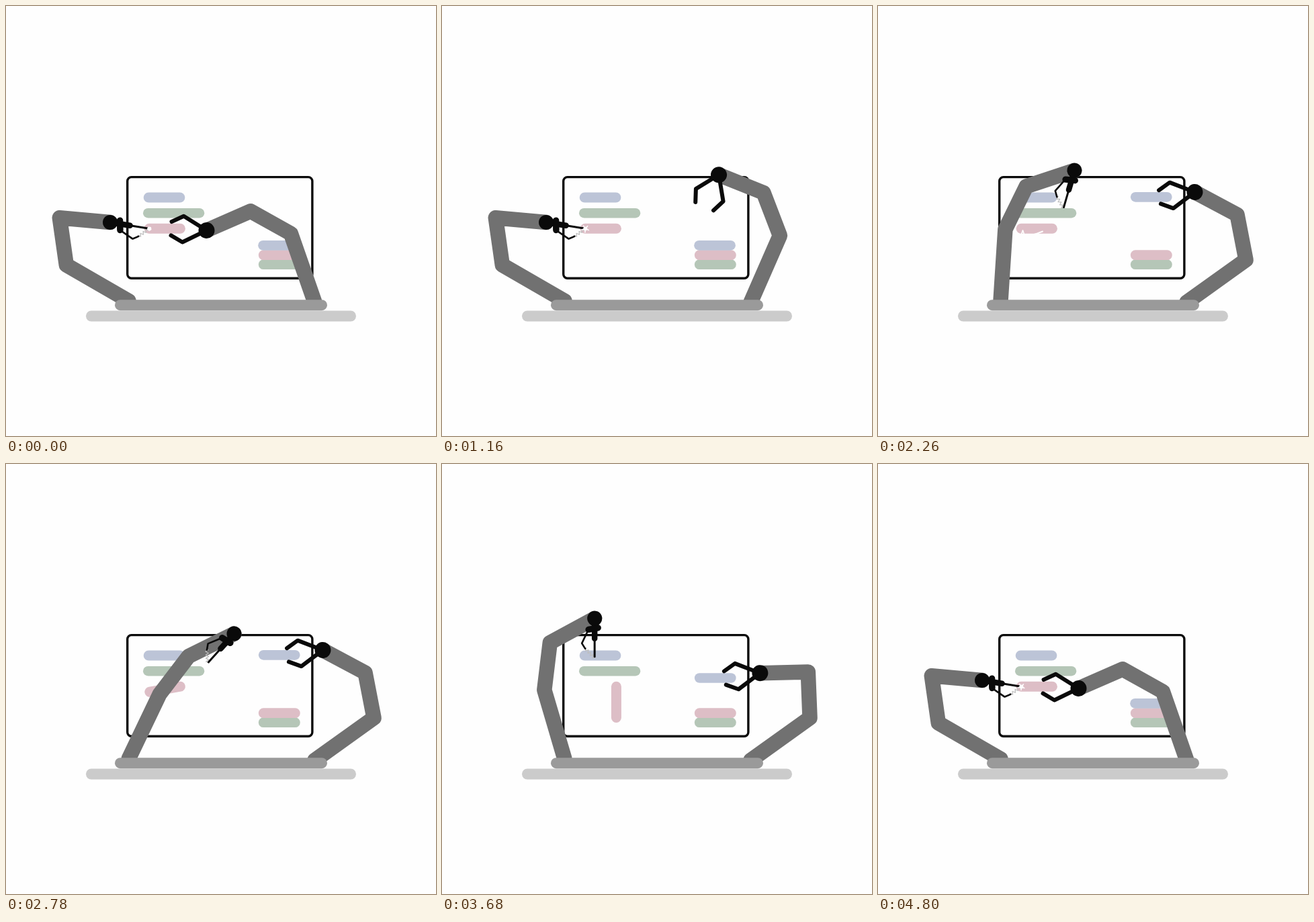
Recreate the animation shown at these times as an HTML page with a canvas. Size 640 px wide and 640 px high, loop 4.82 s.

```html
<!DOCTYPE html>
<html lang="en">
<head>
<meta charset="utf-8">
<title>Robot arms</title>
<style>
  html, body { margin: 0; width: 100%; height: 100%; overflow: hidden; background: #fefefe; }
  canvas { display: block; width: 640px; height: 640px; }
</style>
</head>
<body>
<canvas id="stage" width="640" height="640"></canvas>
<script>
const LOOP = 4820;
const BLACK = '#0a0a0a', WHITE = '#fefefe', ARM = '#717171';
const BLUE = '#bcc4d7', GREEN = '#b5c6b7', PINK = '#ddbec6';
const TAU = Math.PI * 2;
const ctx = document.getElementById('stage').getContext('2d');

const rad = d => d * Math.PI / 180;
const deg = r => r * 180 / Math.PI;
const mix = (a, b, k) => a + (b - a) * k;
const ramp = (t, from, to) => Math.min(1, Math.max(0, (t - from) / (to - from)));
const bump = (t, mid, half) => Math.max(0, Math.cos(Math.PI / 2 * Math.min(1, Math.abs(t - mid) / half)));
const easeOut = k => 1 - (1 - k) ** 2;
const polar = (r, angle) => [r * Math.cos(rad(angle)), r * Math.sin(rad(angle))];

// An arm has three links; side -1 mirrors all its angles.
const left = { base: [182.5, 439], links: [107, 71, 75.5], side: 1 };
const right = { base: [459.5, 441], links: [108.3, 68.5, 71.5], side: -1 };

function joints(arm, angles) {
  const points = [arm.base];
  arm.links.forEach((r, i) => {
    const [dx, dy] = polar(r, angles[i]);
    const [x, y] = points[i];
    points.push([x + dx * arm.side, y + dy]);
  });
  return points;
}

// Turns a lower link angle, a wrist position and a tool angle into link angles.
function pose(arm, lower, x, y, tool) {
  const [, a, b] = arm.links;
  const elbow = joints(arm, [lower, 0, 0])[1];
  const dx = (x - elbow[0]) * arm.side, dy = y - elbow[1];
  const d = Math.min(a + b, Math.hypot(dx, dy));
  const upper = Math.atan2(dy, dx) - Math.acos((a * a + d * d - b * b) / (2 * a * d));
  const fore = Math.atan2(dy - a * Math.sin(upper), dx - a * Math.cos(upper));
  return [lower, deg(upper), deg(fore), tool];
}

const weld = pose(left, -150, 155, 322, 9);
const cut = pose(left, -144.9, 165.3, 311, 37);
const reach = pose(left, -64.4, 339.5, 252.6, 132);
const ready = [...reach.slice(0, 3), 90];
const away = pose(left, -146.2, 132, 275.3, 90);

const hold = pose(right, -70.8, 298.5, 334, -3);
const swung = pose(right, -144.4, 515, 252, 8);
const pick = pose(right, -144.4, 474, 349, 8);
const half = pose(right, -144.4, 473.4, 311, 8);
const lifted = pose(right, -144.4, 471.5, 277, 8);
const cross = pose(right, -114.2, 398, 308, 8);
const scoop = pose(right, -70.8, 311, 360, 8);

// Moves: start, end, pose reached, easing
const leftMoves = [
  [1640, 1840, cut],
  [1840, 2720, reach, easeOut],
  [2880, 3140, ready],
  [3260, 4080, away],
  [4340, 4800, weld]
];
const rightMoves = [
  [800, 1420, swung],
  [1420, 1620, pick],
  [1620, 1820, lifted],
  [3460, 3680, half],
  [3680, 3900, pick],
  [3900, 4080, cross],
  [4080, 4340, scoop],
  [4420, 4780, hold]
];

function poseAt(rest, moves, t) {
  return moves.reduce((now, [from, to, next, ease = k => k]) => {
    const k = ease(ramp(t, from, to));
    return now.map((v, i) => mix(v, next[i], k));
  }, rest);
}

function line(points, width, color) {
  ctx.beginPath();
  points.forEach(p => ctx.lineTo(...p));
  ctx.lineWidth = width;
  ctx.strokeStyle = color;
  ctx.stroke();
}

function dot(x, y, r, color = BLACK) {
  ctx.beginPath();
  ctx.arc(x, y, r, 0, TAU);
  ctx.fillStyle = color;
  ctx.fill();
}

function bar(x, y, w, h, color) {
  line([[x + h / 2, y], [x + w - h / 2, y]], h, color);
}

function place([x, y], angle, side, draw) {
  ctx.save();
  ctx.translate(x, y);
  ctx.scale(side, 1);
  ctx.rotate(rad(angle));
  draw();
  ctx.restore();
}

function gripper(open) {
  const spread = open * 5;
  for (const s of [-1, 1]) {
    line([[0, 0], polar(40, s * (29 + spread)), polar(53.5, s * (11 + spread))], 6, BLACK);
  }
  dot(0, 0, 12);
}

function tool() {
  const zigzag = Array.from({ length: 9 }, (_, i) => {
    const off = i % 2 ? 1.5 : -1.5;
    return [mix(45, 59, i / 8) + off, mix(14, 0, i / 8) + off];
  });
  line(zigzag, 1.2, '#bdbdbd');
  line([[16, 9], [37, 19], [45, 14]], 2.6, BLACK);
  line([[24, 0], [57, 0]], 3, BLACK);
  line([[10, 0], [30, 0]], 8.5, BLACK);
  line([[14, -5], [16.5, 9]], 9.5, BLACK);
  dot(0, 0, 11);
}

function sparks(t) {
  if (t > 1660 && t < 4770) return;
  const size = 2.5 + 3.5 * Math.abs(Math.sin(t / 86));
  ctx.save();
  ctx.translate(213.3, 331.6);
  dot(0, 0, 3, WHITE);
  for (let i = 0; i < 5; i++) line([[0, 0], polar(size, i * 72 - 50)], 1.6, WHITE);
  ctx.restore();
}

function cracks(t) {
  if (t < 1700 || t > 2300) return;
  line([[213, 341], [215.5, 334], [217.5, 340]], 1.8, WHITE);
  line([[229, 341], [237, 338.5], [245, 335.5]], 2, WHITE);
}

function screen() {
  ctx.beginPath();
  ctx.roundRect(180.7, 254.6, 275.2, 150.6, 6);
  ctx.lineWidth = 3.4;
  ctx.strokeStyle = BLACK;
  ctx.stroke();
}

function render(t) {
  const l = poseAt(weld, leftMoves, t), r = poseAt(hold, rightMoves, t);
  const leftArm = joints(left, l), rightArm = joints(right, r);
  const carried = t > 1620 && t < 3900;
  const blueY = carried ? Math.min(356.3, rightArm[3][1] + 7.3) : 356.3;
  const tilt = 10 * ramp(t, 2500, 2740) + 80 * ramp(t, 2880, 3140) - 90 * ramp(t, 4420, 4780);
  // The gripper points down while it passes between the stack and the bars.
  const early = bump(t, 1160, 400), late = bump(t, 4080, 200);

  ctx.fillStyle = WHITE;
  ctx.fillRect(0, 0, 640, 640);
  ctx.lineCap = ctx.lineJoin = 'round';

  screen();
  bar(204.7, 285, 61.7, 15, BLUE);
  bar(204, 308.2, 91.3, 14.6, GREEN);
  bar(375.8, 384.7, 62, 14.8, GREEN);
  bar(375.8, 370.7, 62, 14.8, PINK);
  bar(carried ? 375.9 : 375.2, blueY, 61.7, 14.7, BLUE);
  place([259.4, 331.2], -tilt, 1, () => bar(-53.8, 0, 61.3, 15, PINK));
  cracks(t);

  line(leftArm, 22.5, ARM);
  place(leftArm[3], l[3], left.side, tool);
  sparks(t);
  line(rightArm, 22.5, ARM);
  place(rightArm[3], r[3] + 62 * early + 82 * late, right.side,
    () => gripper(Math.min(1, 2 * (early + late))));

  bar(119, 461.5, 402, 16, '#cbcbcb');
  bar(162, 445.2, 316, 16, '#9a9a9a');
}

const start = performance.now();
function tick() {
  render((performance.now() - start) % LOOP);
  requestAnimationFrame(tick);
}
tick();
</script>
</body>
</html>
```
